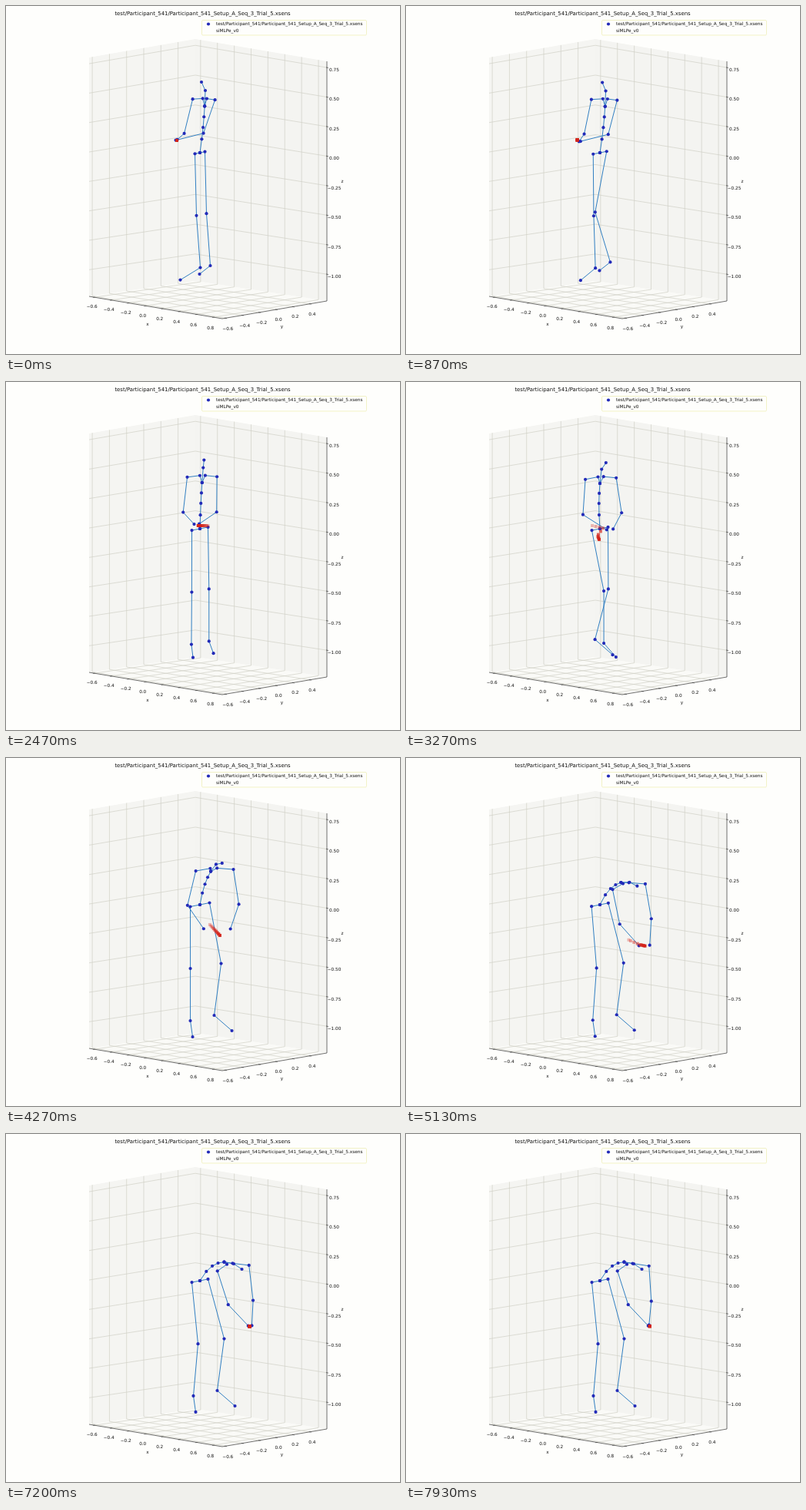
Recreate the animation shown at these times as an HTML page with a canvas. Size 512x453 px, loop 8000 ms.

```html
<!DOCTYPE html>
<html lang="en">
<head>
<meta charset="utf-8">
<title>Motion capture plot</title>
<style>
  html, body { margin: 0; width: 100%; height: 100%; overflow: hidden; background: #fefefc; }
  canvas { display: block; }
</style>
</head>
<body>
<canvas id="plot" width="512" height="453"></canvas>
<script>
const ctx = document.getElementById('plot').getContext('2d');
const LOOP = 8000, STEP = 1000 / 15;
const TITLE = 'test/Participant_541/Participant_541_Setup_A_Seq_3_Trial_5.xsens';
const PAPER = '#fefefc', INK = '#333', GRID = '#d0d0c6';

// Corners of the projected axes box.
const left = [108, 378], front = [281, 407], right = [417, 384], back = [246, 358];
const leftTop = [108, 67], rightTop = [417, 72], backTop = [246, 43];

const pelvis = [252, 191];
const THIGH = 80.5, SHIN = 68, UPPER_ARM = 46;
const STRIDE = 1400, TRAIL_TIME = 500, TRAIL_SIZE = 9;

// Path of the predicted point: time, x, y.
const route = [
  [0, 222, 175], [1100, 223, 174], [1600, 272, 187], [2770, 242, 187], [2950, 256, 190],
  [3100, 249, 200], [3270, 251, 205], [3770, 265, 217], [4270, 278, 231],
  [4630, 292, 238], [4800, 304, 243], [5130, 312, 245], [5700, 316, 251], [8000, 317, 250]
];

const mix = (a, b, f) => a.map((v, i) => v + (b[i] - v) * f);
const add = (a, b) => a.map((v, i) => v + b[i]);
const bezier = (a, b, c, f) => mix(mix(a, b, f), mix(b, c, f), f);
// A bone of fixed length whose end lies dx beside its start.
const bone = ([x, y], dx, length) => [x + dx, y + Math.sqrt(length * length - dx * dx)];

function ramp(time, from, to) {
  const u = Math.min(1, Math.max(0, (time - from) / (to - from)));
  return u * u * (3 - 2 * u);
}

function path(points, color, width) {
  ctx.beginPath();
  points.forEach(p => ctx.lineTo(...p));
  ctx.strokeStyle = color;
  ctx.lineWidth = width;
  ctx.stroke();
}

function fill(points, color) {
  ctx.beginPath();
  points.forEach(p => ctx.lineTo(...p));
  ctx.fillStyle = color;
  ctx.fill();
}

function dot([x, y]) {
  ctx.beginPath();
  ctx.arc(x, y, 2.1, 0, 2 * Math.PI);
  ctx.fillStyle = '#222ab8';
  ctx.fill();
}

function text(string, x, y, size = 5.75, align = 'center') {
  ctx.font = size + 'px "DejaVu Sans", sans-serif';
  ctx.textAlign = align;
  ctx.fillStyle = '#111';
  ctx.fillText(string, x, y);
}

const label = (value, digits) => value.toFixed(digits).replace('-', '\u2212');

function drawAxes() {
  ctx.fillStyle = PAPER;
  ctx.fillRect(0, 0, 512, 453);
  fill([left, leftTop, backTop, back], '#f5f5f2');
  fill([right, rightTop, backTop, back], '#f4f4f1');
  fill([left, front, right, back], '#fafaf7');

  const tick = ([x, y], dx, dy) => path([[x - dx / 2, y - dy / 2], [x + dx, y + dy]], INK, 0.6);
  for (let i = 0; i < 8; i++) {
    const f = 0.04 + 0.128 * i, start = mix(left, front, f);
    path([start, mix(back, right, f), mix(backTop, rightTop, f)], GRID, 0.7);
    tick(start, -2, 0.3);
    text(label(-0.6 + 0.2 * i + 1e-9, 1), 111.7 + 22 * i, 393.3 + 4 * i);
  }
  for (let i = 0; i < 6; i++) {
    const f = 0.03 + 0.1615 * i, start = mix(front, right, f);
    path([start, mix(left, back, f), mix(leftTop, backTop, f)], GRID, 0.7);
    tick(start, 2, 0.35);
    text(label(-0.6 + 0.2 * i + 1e-9, 1), 288.3 + 21.9 * i, 422 - 3.9 * i);
  }
  for (let i = 0; i < 8; i++) {
    const f = 0.026 + 0.1232 * i, end = mix(rightTop, right, f);
    path([mix(leftTop, left, f), mix(backTop, back, f), end], GRID, 0.7);
    tick(end, 2, 0.35);
    text(label(0.75 - 0.25 * i, 2), 426.5, 85 + 38.45 * i);
  }
  path([left, front, right, rightTop], INK, 0.7);

  text('x', 184, 415.5);
  text('y', 358.5, 419);
  text('z', 437, 230);
  text(TITLE, 255.5, 12, 6.9);
  ctx.beginPath();
  ctx.roundRect(254.5, 18.5, 214, 19.5, 1.5);
  ctx.fillStyle = PAPER;
  ctx.fill();
  ctx.strokeStyle = '#ececb0';
  ctx.lineWidth = 0.7;
  ctx.stroke();
  dot([263, 23.5]);
  text(TITLE, 273, 25.4, 5.75, 'left');
  text('siMLPe_v0', 273, 34.3, 5.75, 'left');
}

// The subject walks, turns round, plants the feet, bends down and reaches out.
function bodyChains(time) {
  const walk = ramp(time, 0, 1600), turn = ramp(time, 1550, 3300);
  const plant = ramp(time, 3200, 4200), bend = ramp(time, 3000, 5660);
  const reach = ramp(time, 4200, 5400), rest = ramp(time, 6400, 7930);

  const neck = [259 + walk - 7 * turn + 43 * bend, 110 + walk + turn + 57 * bend];
  const curve = [258 + walk - 11 * turn + 22 * bend, 151 - 1.5 * turn + 9.5 * bend];
  const head = add(neck, [-5 + walk + 9.5 * turn + 5 * bend, -11 + 2 * turn + 16 * bend]);
  const column = [0, 0.22, 0.41, 0.58, 0.75, 1].map(f => bezier(pelvis, curve, neck, f));
  const chest = column[4], collar = mix(chest, neck, 0.5);

  function arm(offset, swing, forearm) {
    const shoulder = add(collar, offset), elbow = bone(shoulder, swing, UPPER_ARM);
    return [chest, mix(collar, shoulder, 0.18), shoulder, elbow, add(elbow, forearm)];
  }
  const rightArm = arm(
    [-16 - 4 * walk - 3 * plant + 8 * reach, 1 + 3 * turn + 6.5 * reach],
    -11 + 3 * walk + 5 * turn - 8 * plant + 25 * reach,
    [-9 + 4 * walk + 36 * turn - 10 * plant + 5 * reach,
      8 + 3 * walk + 8.5 * turn + 11 * plant - 3 * reach]);
  const leftArm = arm(
    [13 + 4 * walk + 3 * turn + 6 * plant, 2 + 2 * rest],
    -15 + 6 * walk + 16 * turn + reach - 5 * rest,
    [-36 + 25 * turn + 11 * reach - 3 * rest, 9 + 12 * turn + 11 * plant + 3 * reach - 4 * rest]);

  const gait = ramp(time, 0, 600) * (1 - plant), facing = 2 * turn - 1;
  const phase = 2 * Math.PI * (time - 1600) / STRIDE + Math.PI / 3;
  const spread = 6.5 + 4 * walk + 2 * plant - 2 * reach;
  function leg(side, thigh, shin, toe) {
    const angle = side < 0 ? phase : phase + Math.PI;
    const stride = facing * gait * (8 + 10 * Math.sin(angle));
    const flex = facing * gait * 28 * Math.max(0, Math.cos(angle));
    const hip = add(pelvis, [side * spread, -side * spread * 0.2]);
    const knee = bone(hip, stride + thigh + 2 * (1 - walk), THIGH);
    const ankle = bone(knee, shin - flex + 5 * (1 - walk), SHIN);
    return [pelvis, hip, knee, ankle, add(ankle, toe)];
  }
  const rightLeg = leg(-1, 8 * reach, -6 * reach,
    [-26 + 12 * walk + 30 * turn - 13 * plant, 16 + 2 * turn + 3 * plant]);
  const leftLeg = leg(1, 15 * plant + 6 * reach, -9 * plant, [-14 + 37 * turn, 11 + 9 * turn]);

  return [[...column, head], rightArm, leftArm, rightLeg, leftLeg];
}

function routeAt(time) {
  const next = Math.max(1, route.findIndex(([t]) => t > time));
  const [start, end] = [route[next - 1], route[next]];
  const f = Math.max(0, (time - start[0]) / (end[0] - start[0]));
  return mix(start, end, f).slice(1);
}

function drawTrail(time) {
  for (let i = 0; i < TRAIL_SIZE; i++) {
    const age = 1 - i / (TRAIL_SIZE - 1);
    const [x, y] = routeAt(time - age * TRAIL_TIME);
    ctx.fillStyle = `rgba(212, 36, 26, ${1 - 0.7 * age})`;
    ctx.fillRect(x - 2, y - 2, 4, 4);
  }
}

function draw(now) {
  const time = Math.floor(now % LOOP / STEP) * STEP;
  drawAxes();
  const chains = bodyChains(time);
  chains.forEach(chain => path(chain, '#317fc2', 1));
  chains.flat().forEach(dot);
  drawTrail(time);
  requestAnimationFrame(draw);
}
requestAnimationFrame(draw);
</script>
</body>
</html>
```
